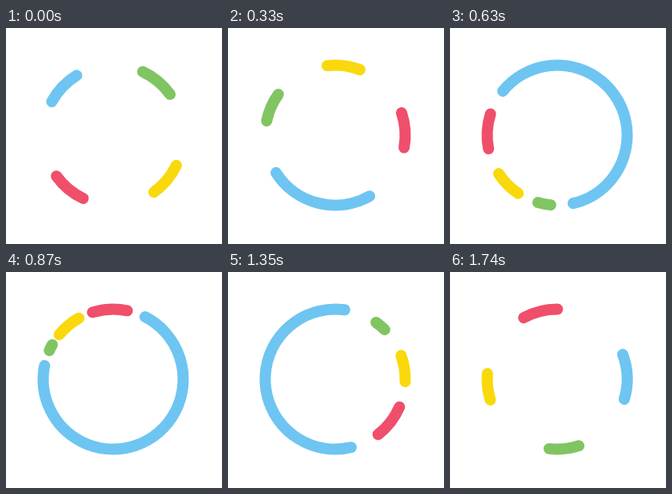
Animation, 270 px wide and 270 px high, one loop 1.77 s. Source, as an HTML page with a canvas:

```html
<!DOCTYPE html>
<html lang="en">
<head>
<meta charset="utf-8">
<title>Loading ring</title>
<style>
  html, body { margin: 0; width: 100%; height: 100%; overflow: hidden; background: #fff; }
  canvas { display: block; width: 270px; height: 270px; }
</style>
</head>
<body>
<canvas id="stage"></canvas>
<script>
const SIZE = 270, CENTER = 134, RADIUS = 87.5, WIDTH = 14;
const LOOP = 1770, STEP = 30;

// The spin closes after three turns in CYCLE ms; the loop cuts it short.
const CYCLE = 2100, SPIN = 1080;
const TIMES = [0, 330, 630, 870, 1110, 1350, 1740];

// Start angle and sweep in degrees, clockwise from the right, at each of TIMES.
const arcs = [
  { color: '#f9d90b',
    start: [25.6, 263.4, 483.9, 579.5, 623.4, 700.2, 882.8],
    sweep: [28.8, 27.3, 22.8, 21.2, 21.6, 21.8, 21.8] },
  { color: '#ef4f6b',
    start: [115.4, 341.4, 528.8, 612.8, 655.7, 743.4, 961.4],
    sweep: [28.8, 28.8, 28.8, 28.8, 28.8, 28.8, 28.8] },
  { color: '#6ec5f1',
    start: [208.6, 420.5, 579, 657.1, 703.4, 796.8, 1059.3],
    sweep: [30, 87.1, 217.8, 254.1, 245.8, 201, 37.3] },
  { color: '#80c562',
    start: [294.9, 551.8, 815.3, 924.2, 965.8, 1025.7, 1152],
    sweep: [29.4, 23.9, 10.7, 5.3, 6.2, 9.3, 24.6] }
];

const canvas = document.getElementById('stage');
const ctx = canvas.getContext('2d');
const ratio = window.devicePixelRatio || 1;
canvas.width = canvas.height = SIZE * ratio;
ctx.scale(ratio, ratio);
ctx.lineWidth = WIDTH;
ctx.lineCap = 'round';

// Smooth curve through the keys; each cycle adds `gain` to the value.
function curve(keys, gain, t) {
  const n = keys.length;
  const wrap = i => Math.floor(i / n);
  const time = i => TIMES[i - wrap(i) * n] + wrap(i) * CYCLE;
  const value = i => keys[i - wrap(i) * n] + wrap(i) * gain;
  const slope = i => (value(i + 1) - value(i)) / (time(i + 1) - time(i));
  const tangent = i => {
    const before = time(i) - time(i - 1), after = time(i + 1) - time(i);
    return (slope(i - 1) * after + slope(i) * before) / (before + after);
  };

  let i = 0;
  while (time(i + 1) <= t) i++;
  const span = time(i + 1) - time(i);
  const u = (t - time(i)) / span, v = 1 - u;
  return value(i) * v * v * (1 + 2 * u) + value(i + 1) * u * u * (1 + 2 * v)
    + span * u * v * (tangent(i) * v - tangent(i + 1) * u);
}

function draw(t) {
  ctx.fillStyle = '#fff';
  ctx.fillRect(0, 0, SIZE, SIZE);
  for (const arc of arcs) {
    const from = curve(arc.start, SPIN, t);
    const to = from + curve(arc.sweep, 0, t);
    ctx.strokeStyle = arc.color;
    ctx.beginPath();
    ctx.arc(CENTER, CENTER, RADIUS, from * Math.PI / 180, to * Math.PI / 180);
    ctx.stroke();
  }
}

const begin = performance.now();
function tick() {
  const t = (performance.now() - begin) % LOOP;
  draw(Math.floor(t / STEP) * STEP);
  requestAnimationFrame(tick);
}
tick();
</script>
</body>
</html>
```
